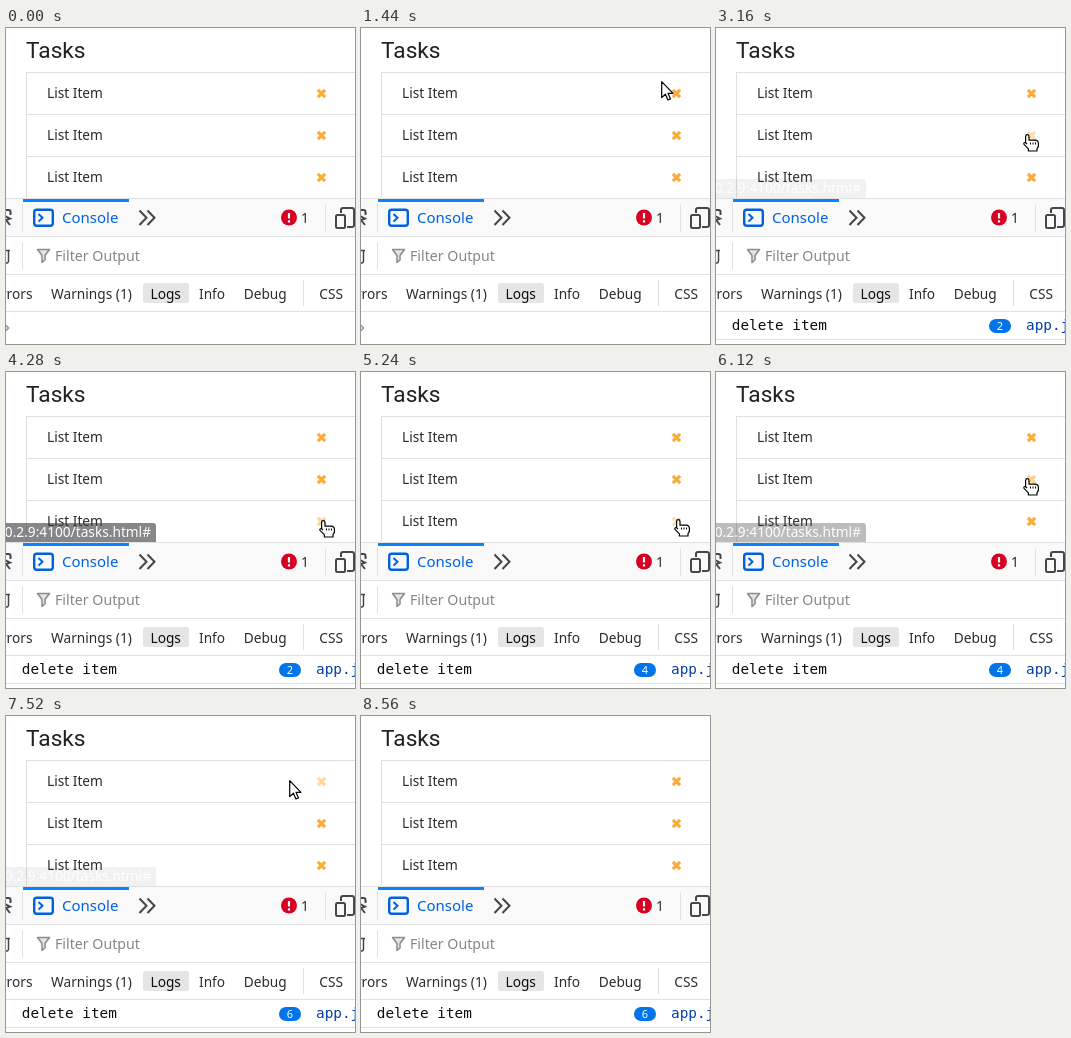
Recreate the animation shown at these times as an HTML page. Size 349 px wide and 316 px high, loop 8.88 s.

```html
<!DOCTYPE html>
<html lang="en">
<head>
<meta charset="utf-8">
<title>Task list and console</title>
<style>
  html, body { margin: 0; width: 100%; height: 100%; overflow: hidden; background: #fff; }
  svg { display: block; width: 349px; height: 316px; }
  text { font-family: "Noto Sans", "Open Sans", sans-serif; font-size: 13.7px; fill: #2b2b30; }
  .page text { font: 14px Roboto, sans-serif; fill: #212121; }
  .page .title { font-size: 22.7px; }
  .mono { font: 14.35px "DejaVu Sans Mono", monospace; fill: #0c0c0d; }
  .line { stroke: #e0e0e2; fill: none; }
  .cross { stroke: #fbab38; stroke-width: 3.2; fill: none; }
  .icon { fill: none; stroke: #45454a; stroke-width: 2; }
</style>
</head>
<body>
<svg viewBox="0 0 349 316">
  <defs>
    <g id="row">
      <path class="line" d="M21 .5H349"/>
      <text x="41" y="26">List Item</text>
    </g>
    <path id="x" class="cross" d="M-3.6-3.6 3.6 3.6M3.6-3.6-3.6 3.6"/>
  </defs>

  <g class="page">
    <text class="title" x="20" y="30">Tasks</text>
    <path class="line" d="M20.5 171V44"/>
    <use href="#row" y="44"/>
    <use href="#row" y="86"/>
    <use href="#row" y="128"/>
    <use class="del" href="#x" x="315.5" y="65.5"/>
    <use class="del" href="#x" x="315.5" y="107.5"/>
    <use class="del" href="#x" x="315.5" y="149.5"/>
  </g>

  <g id="status">
    <path d="M0 151H147a3 3 0 0 1 3 3V170H0Z" fill="#38383d"/>
    <text x="145" y="165" text-anchor="end" style="fill:#fff">10.0.2.9:4100/tasks.html#</text>
  </g>

  <!-- tool tabs -->
  <rect y="170" width="349" height="39" fill="#f9f9fa"/>
  <path class="line" d="M0 170.5H349M0 208.5H349M16.5 175V204M319.5 176V204"/>
  <rect x="17" y="171" width="106" height="3" fill="#0a84ff"/>
  <path class="icon" d="M0 182H2.5a2 2 0 0 1 2 2V187M-3 187 4 190.5 0 192 4 197"/>
  <rect x="28.2" y="181.8" width="18.6" height="16" rx="2.5" fill="none" stroke="#0060df" stroke-width="2.4"/>
  <path d="M32.5 186 36.5 189.8 32.5 193.6" fill="none" stroke="#0060df" stroke-width="2"/>
  <text x="56" y="195" style="font-size:15px;fill:#0060df">Console</text>
  <path class="icon" d="M133.5 182.5 140.5 189.8 133.5 197M141.5 182.5 148.5 189.8 141.5 197"/>
  <circle cx="283" cy="189.5" r="8" fill="#d70022"/>
  <path d="M283 185V190.5M283 192.3V194.5" stroke="#fff" stroke-width="2.2"/>
  <text x="295" y="195">1</text>
  <path class="icon" d="M335 185V182a2 2 0 0 1 2-2H346a2 2 0 0 1 2 2V197a2 2 0 0 1-2 2H341"/>
  <rect class="icon" x="330" y="187" width="9" height="13" rx="1.5" style="fill:#f9f9fa"/>

  <!-- filter row -->
  <path class="line" d="M0 246.5H349M16.5 214V241"/>
  <path class="icon" d="M0 222.5H4M2.5 223V233a2 2 0 0 1-2.5 2" style="stroke-width:1.5"/>
  <path d="M31.5 221.5H43.5L39 227.5V232L36 234.5V227.5Z" fill="#e4e4e6" stroke="#8a8a8f" stroke-width="1.5" stroke-linejoin="round"/>
  <text x="49" y="233" style="font-size:14.2px;fill:#85858a">Filter Output</text>

  <!-- category row -->
  <path class="line" d="M0 283.5H349M297.5 252V278"/>
  <rect x="137" y="255" width="46" height="20" rx="2.5" fill="#e5e5e6"/>
  <text x="26.5" y="271" text-anchor="end">Errors</text>
  <text x="45" y="271">Warnings (1)</text>
  <text x="144.5" y="271" style="fill:#0c0c0d">Logs</text>
  <text x="193" y="271">Info</text>
  <text x="237.7" y="271">Debug</text>
  <text x="313.3" y="271">CSS</text>

  <path id="prompt" d="M-1 296.5 2.5 300 -1 303.5" fill="none" stroke="#9a9a9f" stroke-width="1.6"/>
  <g id="log">
    <path class="line" d="M0 311.5H349"/>
    <text class="mono" x="15.8" y="302">delete item</text>
    <text class="mono" x="310" y="302" style="fill:#003eaa">app.js</text>
    <g id="badge">
      <rect x="273" y="291" width="22" height="14" rx="7" fill="#0074e8"/>
      <text id="count" x="284" y="302" text-anchor="middle" style="font-size:11px;fill:#fff"></text>
    </g>
  </g>

  <g id="cursor" stroke="#000" fill="#fff" stroke-linejoin="round">
    <path id="arrow" stroke-width="1.2" d="M.7.7V16.6L4.4 13.2 6.9 19 9.5 17.9 7 12.3H12Z"/>
    <g id="hand" transform="translate(-3 -1)">
      <path stroke-width="1.2" d="M2.6 9V2.4a1.7 1.7 0 0 1 3.4 0V6.2H12.2a3 3 0 0 1 3.2 3V12.4L14 14.6V17H5.4V14.8L1 10.4a1.2 1.2 0 0 1 1.6-1.7L4 10"/>
      <path d="M7.5 8.5V10.5M10 8.5V10.5M12.5 8.5V10.5" fill="none"/>
    </g>
  </g>
</svg>
<script>
  const LOOP = 8880, STEP = 40, FADE = 300;
  const ENTER = 720, EXIT = 8560;
  const $ = id => document.getElementById(id);
  const crosses = [...document.querySelectorAll('.del')];

  // places where the pointer rests or turns
  const stops = [
    { from: ENTER, to: ENTER, x: 131, y: 0 },
    { from: 960, to: 1120, x: 249, y: 16 },
    { from: 1720, to: 2040, x: 317, y: 66 },
    { from: 2680, to: 3200, x: 310, y: 107 },
    { from: 3960, to: 3960, x: 312, y: 165 },
    { from: 4360, to: 5320, x: 316, y: 148 },
    { from: 5840, to: 5840, x: 311, y: 91 },
    { from: 6120, to: 6360, x: 310, y: 107 },
    { from: 7240, to: 7440, x: 315, y: 65 },
    { from: 7520, to: 7520, x: 283, y: 64 },
    { from: 8200, to: 8280, x: 35, y: 6 },
    { from: EXIT, to: EXIT, x: 29, y: -20 }
  ];
  const clicks = [1880, 3000, 4520, 5240, 6360, 7360];

  const ramp = (t, from, length) => Math.min(1, Math.max(0, (t - from) / length));
  const easeOut = k => 1 - (1 - k) ** 1.8;
  const show = (id, on) => { $(id).style.display = on ? '' : 'none'; };

  function tip(t) {
    const next = stops.findIndex(s => t < s.from);
    if (next < 1) return stops.at(next);
    const a = stops[next - 1], b = stops[next];
    const k = easeOut(ramp(t, a.to, b.from - a.to));
    return { x: a.x + (b.x - a.x) * k, y: a.y + (b.y - a.y) * k };
  }

  function rowAt(t) {
    const { x, y } = tip(t);
    return crosses.findIndex((c, i) => Math.abs(x - 315.5) < 7 && Math.abs(y - 65.5 - 42 * i) < 10);
  }

  // walk the pointer once to learn when it enters and leaves each cross
  const hovers = [];
  for (let t = ENTER, last = -1; t < EXIT; t += STEP) {
    const row = rowAt(t);
    if (row !== last && row >= 0) hovers.push({ row, start: t });
    if (row >= 0) hovers.at(-1).end = t + STEP;
    last = row;
  }

  function draw(t) {
    const fade = crosses.map(() => 0);
    let status = 0;
    for (const { row, start, end } of hovers) {
      fade[row] = Math.max(fade[row], ramp(t, start, FADE) - ramp(t, end, FADE));
      // the link preview goes away on the first click or on leaving
      const gone = Math.min(end, clicks.find(c => c > start) ?? end);
      const shown = ramp(t, start + 150, 150) * (1 - ramp(t, gone + 20, 180)) ** 1.8;
      status = Math.max(status, shown);
    }
    crosses.forEach((c, i) => c.setAttribute('opacity', 1 - 0.62 * fade[i]));
    $('status').setAttribute('opacity', status);

    const count = clicks.filter(c => t >= c).length;
    show('prompt', !count);
    show('log', count);
    show('badge', count > 1);
    $('count').textContent = count;

    const { x, y } = tip(t);
    const over = rowAt(t) >= 0;
    show('cursor', t >= ENTER && t < EXIT);
    show('arrow', !over);
    show('hand', over);
    $('cursor').setAttribute('transform', `translate(${Math.round(x)} ${Math.round(y)})`);
  }

  const origin = performance.now();
  function tick() {
    const t = (performance.now() - origin) % LOOP;
    draw(Math.floor(t / STEP) * STEP);
    requestAnimationFrame(tick);
  }
  tick();
</script>
</body>
</html>
```
